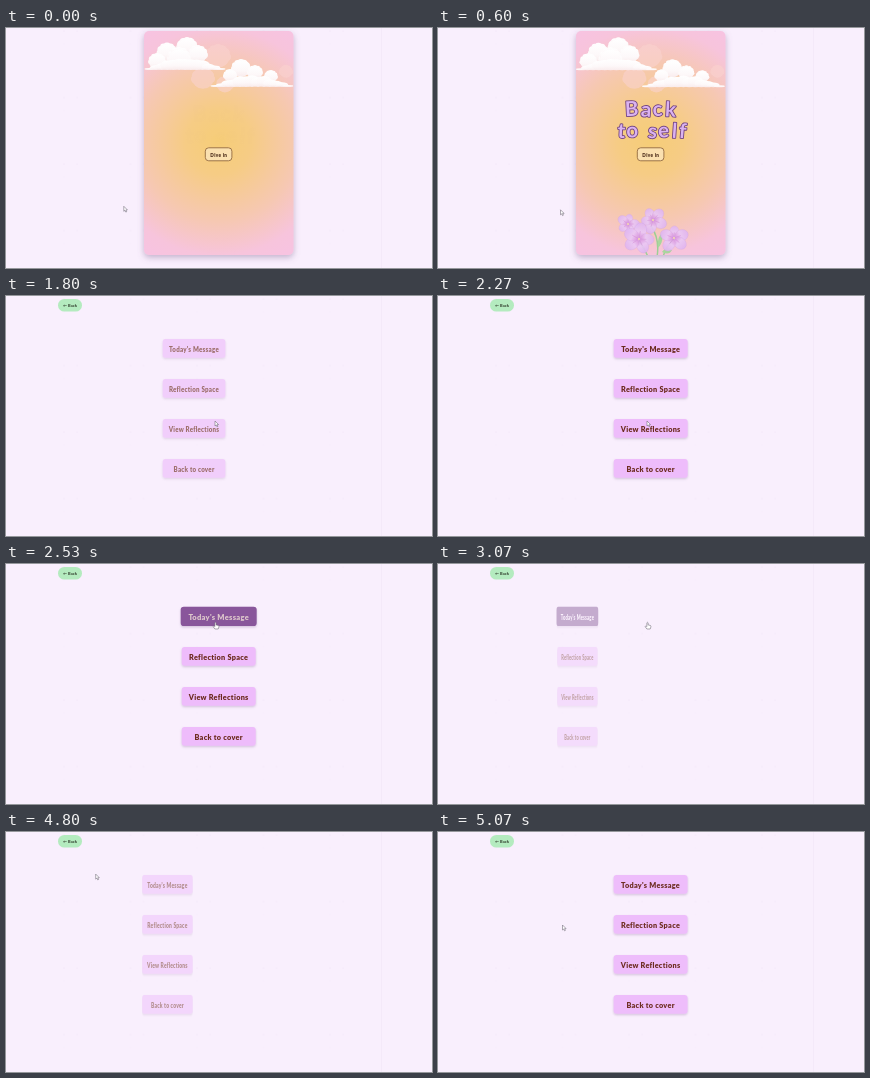
Animation of 426x240 px, one loop 5.19 s. Source, as an HTML page:

```html
<!DOCTYPE html>
<html lang="en">
<head>
<meta charset="utf-8">
<title>Back to self</title>
<style>
  html, body { margin: 0; width: 100%; height: 100%; overflow: hidden; background: #f9effd; }
  svg { display: block; width: 100vw; height: 100vh; }
  text { font-family: Lato, "DejaVu Sans", sans-serif; font-weight: 900; text-anchor: middle; }
  .title { font-size: 20.5px; font-weight: 700; letter-spacing: 2px; fill: #dab2f0; stroke: #6f4180; stroke-width: 1.7px; stroke-linejoin: round; paint-order: stroke; }
  .item { font-size: 7.3px; letter-spacing: .28px; fill: #6b2a1d; }
  .small { font-size: 4.6px; letter-spacing: .35px; fill: #4a2a18; }
  .back { font-size: 3.9px; letter-spacing: .1px; fill: #3b4a38; }
  .note { font-size: 10.5px; letter-spacing: .55px; fill: #512527; }
</style>
</head>
<body>
<svg viewBox="0 0 426 240">
  <defs>
    <radialGradient id="sun" gradientUnits="userSpaceOnUse" cx="212.5" cy="114" r="132">
      <stop offset="0" stop-color="#f6cd77"/>
      <stop offset=".25" stop-color="#f6cc85"/>
      <stop offset=".6" stop-color="#f6c8b2"/>
      <stop offset=".86" stop-color="#f7c4dc"/>
      <stop offset="1" stop-color="#f7c3e1"/>
    </radialGradient>
    <linearGradient id="puff" x2="0" y2="1">
      <stop offset="0" stop-color="#fff"/>
      <stop offset=".6" stop-color="#fdf8f9"/>
      <stop offset="1" stop-color="#f9ebec"/>
    </linearGradient>
    <linearGradient id="petal" x2="0" y2="1">
      <stop offset="0" stop-color="#dfb5f1"/>
      <stop offset=".6" stop-color="#eac8f5"/>
      <stop offset="1" stop-color="#d995e0"/>
    </linearGradient>
    <pattern id="dots" width="66.5" height="66.5" patternUnits="userSpaceOnUse" x="57" y="2">
      <circle cx="1" cy="1" r=".6" fill="#ecdff2"/>
      <circle cx="14" cy="1" r=".6" fill="#efe3f4"/>
      <circle cx="1" cy="14" r=".5" fill="#f3e8f7"/>
    </pattern>
    <clipPath id="card"><rect x="138" y="3" width="149.5" height="224" rx="5"/></clipPath>
    <filter id="shade" x="-20%" y="-20%" width="140%" height="150%">
      <feDropShadow dx="0" dy="2.5" stdDeviation="3.2" flood-color="#80668f" flood-opacity=".45"/>
    </filter>
    <filter id="lift" x="-20%" y="-30%" width="140%" height="190%">
      <feDropShadow dx="0" dy="1.3" stdDeviation="1.1" flood-color="#8d6da0" flood-opacity=".35"/>
    </filter>
    <filter id="soft"><feGaussianBlur stdDeviation=".4"/></filter>
  </defs>

  <rect width="426" height="240" fill="#f9effd"/>
  <rect x="52" width="323" height="240" fill="url(#dots)"/>
  <path d="M375.5 0V240" stroke="#f4e9f9"/>

  <g id="cover">
    <rect x="138" y="3" width="149.5" height="224" rx="5" fill="url(#sun)" filter="url(#shade)"/>
    <g clip-path="url(#card)">
      <g id="haze" fill="#fad3cf" opacity=".6" filter="url(#soft)"></g>
      <g id="cloudA" fill="url(#puff)" filter="url(#soft)"></g>
      <g id="cloudB" fill="url(#puff)" filter="url(#soft)"></g>
      <g id="flowers">
        <path d="M213 198Q222 211 219 229M236 211Q228 218 225 229M201 213Q207 221 210 229" fill="none" stroke="#9ccf95" stroke-width="1.5"/>
        <path d="M220 220Q219 209 224 205Q226 214 220 220ZM224 224Q229 217 234 222Q231 228 224 224Z" fill="#a9d69d"/>
      </g>
    </g>
    <g id="title">
      <text class="title" x="213.5" y="88.3" rotate="-3 4 -4 3">Back</text>
      <text class="title" x="214.5" y="109.8" rotate="3 -4 0 5 -4 4 5">to self</text>
    </g>
    <rect x="199.3" y="119.8" width="26.6" height="13" rx="3.4" fill="#fae0b0" stroke="#936a40" stroke-width=".9"/>
    <text class="small" x="212.8" y="128.6">Dive in</text>
  </g>

  <g id="menu"></g>

  <g id="note">
    <path d="M176 85Q188 81 214 82T248 83Q250 87 245 91L247 94Q251 99 248 102Q253 105 249 108Q230 106 206 107Q186 108 176 106Q173 97 175 91Z" fill="#f9c1d0"/>
    <path d="M175 88Q206 85 247 87L244 91Q208 89 177 93ZM178 104Q212 101 250 104L249 108Q212 104 178 106Z" fill="#f5aec2" opacity=".65"/>
    <text class="note" x="212.8" y="100">Stay present</text>
  </g>

  <g id="back">
    <rect x="52" y="3" width="24" height="12.6" rx="6.3" fill="#b4ebbf"/>
    <text class="back" x="64" y="11">← Back</text>
  </g>

  <g id="cursor" stroke="#6b6672" stroke-width=".55" stroke-linejoin="round" fill="#fff">
    <path id="arrow" d="M0 0V5L1.2 4L2 5.8L2.9 5.4L2.1 3.6H3.6Z"/>
    <path id="hand" d="M-.6 .5Q0 -.5 .6 .5V2.6L3 3.2Q3.6 3.5 3.4 4.6L2.7 6.7H-.6L-2.3 4.4Q-2.2 3.4 -1.2 3.9L-.6 4.3Z"/>
  </g>
</svg>

<script>
const LOOP = 5190, HINGE = 52, MENU_AT = 1650;
const $ = id => document.getElementById(id);

let seed = 7;
const random = () => (seed = seed * 16807 % 2147483647) / 2147483647;
const vary = (mid, spread) => mid + (random() - .5) * 2 * spread;

function add(parent, tag, attrs, text) {
  const el = document.createElementNS("http://www.w3.org/2000/svg", tag);
  for (const k in attrs) el.setAttribute(k, attrs[k]);
  if (text) el.textContent = text;
  parent.append(el);
  return el;
}

// A lobe is a round body with small bumps around its upper rim
function lobe(parent, cx, cy, r) {
  for (let a = 0; a <= Math.PI; a += Math.PI / 6) {
    const b = r * vary(.36, .1), d = r - b;
    add(parent, "circle", { cx: cx - d * Math.cos(a), cy: cy - d * Math.sin(a), r: b });
  }
  add(parent, "ellipse", { cx, cy, rx: r * .88, ry: r * .82 });
}

// Flat puffs along a base line, thinning towards both ends
function tail(parent, left, right, y, height) {
  for (let i = 0; i <= 12; i++) {
    const u = i / 12, ry = 1 + height * Math.sin(Math.PI * u) * vary(.9, .2);
    add(parent, "ellipse", { cx: left + 5 + (right - left - 10) * u, cy: y - ry, rx: 5 + ry * .5, ry });
  }
}

function cloud(id, lobes) {
  for (const [x, y, r] of lobes) lobe($(id), x, y, r);
}
cloud("haze", [[212, 29, 13], [197, 51, 12], [219, 57, 9], [280, 44, 7]]);
cloud("cloudA", [[181, 20, 11], [161, 25, 10.5], [192, 27, 10], [151, 34, 9], [173, 31, 12]]);
tail($("cloudA"), 139, 219, 42, 5);
cloud("cloudB", [[235, 41, 10], [249, 45, 8], [224, 48, 7], [265, 49, 7]]);
tail($("cloudB"), 205, 287, 59, 5);

// Flowers: loose round petals of uneven size
const bed = $("flowers");
const blooms = [[190, 196, 11], [215, 192, 13], [236, 210, 13], [201, 211, 15]].map(([x, y, r]) => {
  const g = add(bed, "g", { opacity: .93 });
  for (let i = 0; i < 5; i++) {
    const turn = `rotate(${vary(i * 72, 9)}) scale(${vary(1, .13)})`;
    add(g, "ellipse", { cy: -r * .55, rx: r * .39, ry: r * .48, transform: turn, fill: "url(#petal)", stroke: "#d0a3e4", "stroke-width": .3 });
    add(g, "path", { d: `M0 0V${-r * .5}`, transform: turn, stroke: "#d18bd9", "stroke-width": .5 });
  }
  add(g, "circle", { r: 1, fill: "#f3dcae" });
  return { g, x, y, turn: vary(0, 30) };
});

const items = ["Today's Message", "Reflection Space", "View Reflections", "Back to cover"].map((label, i) => {
  const g = add($("menu"), "g", {}), y = 43 + 40 * i;
  const box = add(g, "rect", { x: 175.7, y, width: 74, height: 18.8, rx: 3, fill: "#eebcfb", filter: "url(#lift)" });
  const text = add(g, "text", { class: "item", x: 212.7, y: y + 13.2 }, label);
  return { g, box, text };
});

// Cursor moves: from time, to time, x, y
const moves = [
  [70, 530, 122.5, 181.8], [600, 1600, 209, 125], [2270, 2530, 209.5, 58.3],
  [3200, 3730, 203.5, 123], [3730, 4060, 69.8, 13], [4470, 5070, 124.5, 93]
];

const span = (t, from, to) => Math.min(1, Math.max(0, (t - from) / (to - from)));
const easeOut = p => 1 - (1 - p) ** 3;
const blend = (a, b, k) => `rgb(${a.map((v, i) => Math.round(v + (b[i] - v) * k))})`;
const show = (el, on) => { el.style.display = on ? "" : "none"; };
const move = (el, x, y, rest = "") => el.setAttribute("transform", `translate(${x} ${y}) ${rest}`);

function cursorAt(t) {
  let x = 117.8, y = 178.3;
  for (const [from, to, tx, ty] of moves) {
    const k = span(t, from, to) ** 1.7;
    x += (tx - x) * k;
    y += (ty - y) * k;
  }
  return [x, y];
}

// The page swings open on its left edge, and swings shut the same way
function menuOpen(t) {
  if (t < 2860) return easeOut(span(t, MENU_AT, MENU_AT + 520));
  if (t < 4000) return 1 - span(t, 2860, 3125) ** 2;
  return easeOut(span(t, 4700, 5220));
}

function drawCover(t) {
  const k = easeOut(span(t, 0, 560)), s = t / 1000;
  $("title").setAttribute("opacity", k);
  move($("title"), 0, 5 * (1 - k));
  bed.setAttribute("opacity", k);
  move(bed, 0, 30 * (1 - k));
  for (const { g, x, y, turn } of blooms) move(g, x, y, `rotate(${turn + 2 * Math.sin((s - .6) * 2.4)})`);
  move($("cloudA"), -s, .5 * s);
  move($("cloudB"), -s, .5 * s);
  move($("haze"), -s, 0);
}

function drawMenu(t) {
  const open = menuOpen(t);
  show($("menu"), open > .01);
  $("menu").setAttribute("opacity", open);
  move($("menu"), HINGE, 0, `scale(${Math.sin(open * Math.PI / 2)} 1) translate(${-HINGE} 0)`);
  const h = t < 4000 ? easeOut(span(t, 2450, 2660)) : 0;
  const { g, box, text } = items[0];
  move(g, 212.7, 52.6, `scale(${1 + .035 * h}) translate(-212.7 -52.6)`);
  box.setAttribute("fill", blend([238, 188, 251], [106, 55, 126], h));
  text.style.fill = blend([107, 42, 29], [255, 246, 255], h);
}

function draw(t) {
  const onCover = t < MENU_AT;
  show($("cover"), onCover);
  show($("back"), !onCover);
  drawCover(t);
  drawMenu(t);
  $("note").setAttribute("opacity", easeOut(span(t, 3220, 3720)) * (1 - span(t, 4440, 4670)));
  move($("cursor"), ...cursorAt(t));
  const pointing = (t > 2450 && t < 3270) || (t > 4030 && t < 4600);
  show($("hand"), pointing);
  show($("arrow"), !pointing);
}

const start = performance.now();
function tick() {
  draw((performance.now() - start) % LOOP);
  requestAnimationFrame(tick);
}
draw(0);
requestAnimationFrame(tick);
</script>
</body>
</html>
```
